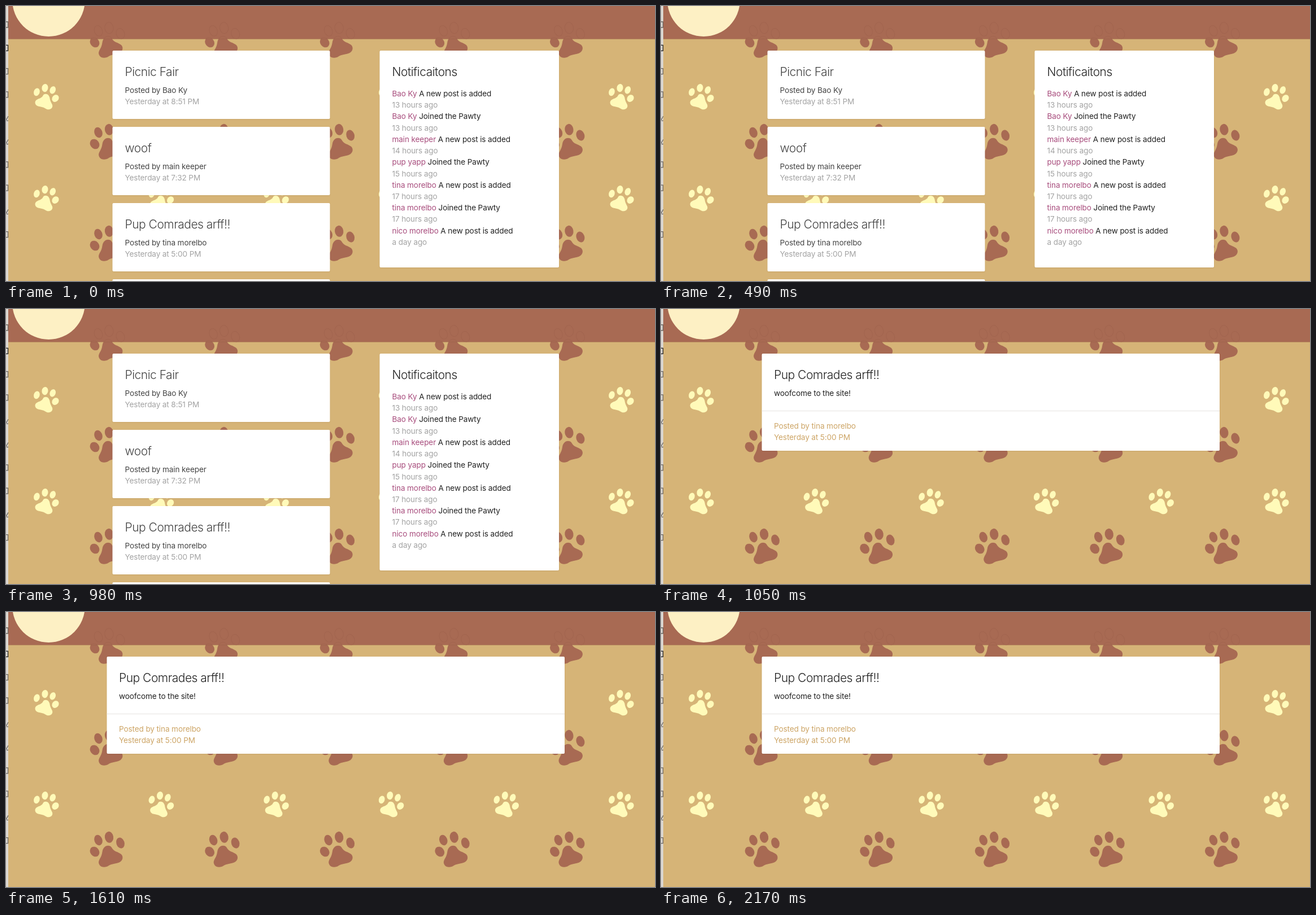
An HTML page for the animation above (2.24 s loop, 1149 px wide and 487 px high).

```html
<!DOCTYPE html>
<html lang="en">
<head>
<meta charset="utf-8">
<title>Posts</title>
<style>
  html, body { margin: 0; width: 100%; height: 100%; overflow: hidden; background: #d6b477; }
  svg { display: block; width: 100%; height: 100%; }
  text { font: 400 13.6px Inter, "Open Sans", sans-serif; letter-spacing: -.13px; white-space: pre; }
  .title { font-weight: 300; font-size: 21px; letter-spacing: -.5px; }
  .card { fill: #fff; filter: drop-shadow(0 1px 1px rgba(90, 60, 20, .1)); }
</style>
</head>
<body>
<svg id="stage" viewBox="0 0 1149 487" preserveAspectRatio="none">
  <defs>
    <g id="paw">
      <ellipse cx="9" cy="35.5" rx="7.8" ry="9.4" transform="rotate(-38 9 35.5)"/>
      <ellipse cx="15.5" cy="15" rx="7" ry="9.5" transform="rotate(-20 15.5 15)"/>
      <ellipse cx="34.5" cy="9.8" rx="7.6" ry="10" transform="rotate(-8 34.5 9.8)"/>
      <ellipse cx="54.5" cy="20" rx="7.2" ry="9.6" transform="rotate(-18 54.5 20)"/>
      <path d="M25 29C28 24 36 23 39 28C43 36 50 35 56 40C61 45 58 53 51 55C44 57 39 57 34 60C29 64 20 64 17 58C14 52 19 48 21 42C23 37 22 33 25 29Z"/>
    </g>
    <clipPath id="bar"><path d="M4 0H1149V58H4Z"/></clipPath>
  </defs>
  <path fill="#d6b477" d="M0 0H1149V487H0Z"/>
  <g id="paws"></g>
  <g id="list"></g>
  <g id="detail"></g>
  <path fill="#a86a53" d="M4 0H1149V58.4H4Z" style="filter:drop-shadow(0 .5px .5px rgba(70,35,15,.3))"/>
  <g id="ghosts" clip-path="url(#bar)" fill="none" stroke="#8f5543" opacity=".25"></g>
  <circle cx="75.5" cy="-10.3" r="64.3" fill="#fdf0c4"/>
  <path fill="#dcd8d2" d="M0 0H4V487H0Z"/>
  <g id="rail" fill="none" stroke="#6d6762" stroke-width="1.3"></g>
</svg>
<script>
const LOOP = 2240, OPEN_AT = 1050;
const BROWN = "#a86a53", CREAM = "#fffab9", DARK = "#222", SOFT = "#444",
      GREY = "#a3a3a3", PINK = "#a84d7d", TAN = "#cda566";
const $ = id => document.getElementById(id);

const paw = (x, y, flip, attrs = "") =>
  `<use href="#paw" ${attrs} transform="translate(${x} ${y}) scale(${flip ? "-.726 .72" : "1"})"/>`;
const card = (x, y, w, h) =>
  `<rect class="card" x="${x}" y="${y}" width="${w}" height="${h}" rx="2"/>`;
const text = (x, y, s, fill, cls = "") =>
  `<text x="${x}" y="${y}" fill="${fill}" class="${cls}">${s}</text>`;

let paws = "", ghosts = "";
for (let col = 0; col < 6; col++) {
  const dx = col * 203.6;
  for (let row = 0; row < 3; row++) {
    if (col < 5) paws += paw(148 + dx, 29 + row * 180, false, `fill="${BROWN}"`);
    if (row) paws += paw(94 + dx, row * 180 - 42, true, `fill="${CREAM}"`);
  }
  if (col < 5) ghosts += paw(148 + dx, 29, false);
}
$("paws").innerHTML = paws;
$("ghosts").innerHTML = ghosts;

const posts = [
  ["Picnic Fair", "Bao Ky", "8:51"],
  ["woof", "main keeper", "7:32"],
  ["Pup Comrades arff!!", "tina morelbo", "5:00"]
];
const added = "A new post is added", joined = "Joined the Pawty";
const notices = [
  ["Bao Ky", added, "13 hours ago"],
  ["Bao Ky", joined, "13 hours ago"],
  ["main keeper", added, "14 hours ago"],
  ["pup yapp", joined, "15 hours ago"],
  ["tina morelbo", added, "17 hours ago"],
  ["tina morelbo", joined, "17 hours ago"],
  ["nico morelbo", added, "a day ago"]
];

$("list").innerHTML = posts.map(([title, who, time], i) => {
  const y = 79 + i * 135;
  return card(188.5, y, 385, 121)
    + text(210.5, y + 45, title, SOFT, "title")
    + text(210.5, y + 74.5, "Posted by " + who, SOFT)
    + text(210.5, y + 94.7, `Yesterday at ${time} PM`, GREY);
}).join("") + card(188.5, 484, 385, 121)
  + card(661.5, 79, 317.5, 384)
  + text(683.5, 124, "Notificaitons", DARK, "title")
  + notices.map(([who, what, when], i) => {
    const y = 160 + i * 40.45;
    return text(683.5, y, `<tspan fill="${PINK}">${who}</tspan> ${what}`, DARK)
      + text(683.5, y + 20.2, when, GREY);
  }).join("");

$("detail").innerHTML = card(178.5, 79, 810.5, 172)
  + `<path d="M178.5 180.5H989" stroke="#e6e4e0"/>`
  + text(200, 124, posts[2][0], DARK, "title")
  + text(200, 153.5, "woofcome to the site!", DARK)
  + text(200, 211.7, "Posted by " + posts[2][1], TAN)
  + text(200, 231.9, "Yesterday at 5:00 PM", TAN);

// Icon edges peeking in from the left
$("rail").innerHTML = Array.from({ length: 10 }, (_, i) => {
  const y = 33 + i * 41.3;
  return i === 4 || i === 5 || i === 8
    ? `<path d="M0 ${y + 4}L4 ${y - 3}M1 ${y + 5}H4"/>`
    : `<path d="M0 ${y - 5}H3.5V${y + 5}H0" ${i === 1 ? 'stroke="#222"' : ""}/>`;
}).join("");

function draw(now) {
  const open = now % LOOP >= OPEN_AT;
  $("list").style.display = open ? "none" : "";
  $("detail").style.display = open ? "" : "none";
  requestAnimationFrame(draw);
}
draw(0);
</script>
</body>
</html>
```
